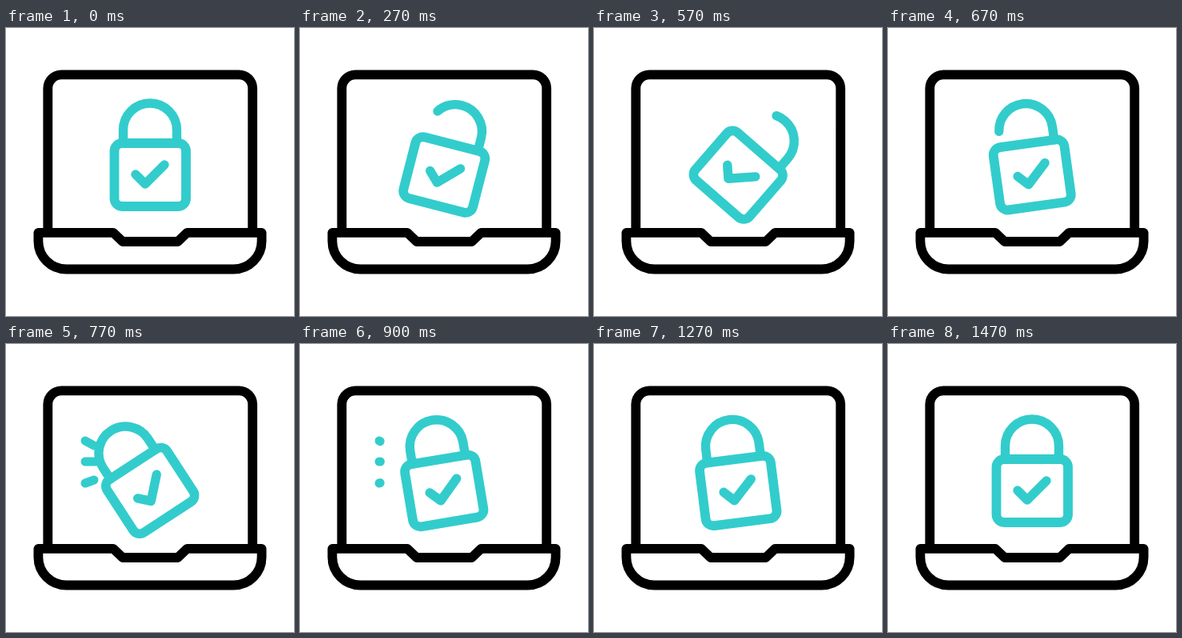
Animation, 360 px wide and 360 px high, one loop 1.67 s. Source, as an HTML page:

```html
<!DOCTYPE html>
<html lang="en">
<head>
<meta charset="utf-8">
<title>Secure laptop</title>
<style>
  html, body { margin: 0; width: 100%; height: 100%; overflow: hidden; background: #fff; }
  svg { display: block; width: 100%; height: 100%; }
</style>
</head>
<body>
<svg viewBox="0 0 360 360" fill="none" stroke-width="11.8" stroke-linecap="round" stroke-linejoin="round">
  <g stroke="#000">
    <path d="M52.3 255V75A17 17 0 0 1 69.3 58.3H291.2A17 17 0 0 1 308.2 75V255"/>
    <path d="M40.4 255.8H134L145.8 267H214.7L226.5 255.8H319.6V266.5A35 35 0 0 1 284.6 301.5H75.4A35 35 0 0 1 40.4 266.5Z"/>
  </g>
  <g stroke="#33cccc">
    <g id="burst" stroke-width="11">
      <path pathLength="1" d="M110 127L99 121"/>
      <path pathLength="1" d="M112 147H99"/>
      <path pathLength="1" d="M110 170L99 174"/>
    </g>
    <g id="lock">
      <path id="shackle" stroke-width="11.4" pathLength="100" d="M146.5 144V127.5A33.5 33.5 0 0 1 213.5 127.5V144"/>
      <rect x="135.5" y="144" width="89.5" height="79" rx="9.7"/>
      <path stroke-width="11.4" d="M162 183L174 195L198 171"/>
    </g>
  </g>
</svg>
<script>
const LOOP = 1670, FPS = 30;
const [lock, shackle, burst] = ["lock", "shackle", "burst"].map(id => document.getElementById(id));

// Keys are [frame, value]
const tilt = [[2, 0], [17, 41], [22, -34.5], [32, 15.5], [38, -7.2], [44, 0]];
const opening = [[2, 0], [12, 41], [17, 41], [22, 0]];
const burstHead = [[20, 0], [23, 1]];
const burstTail = [[23, 0], [28, 1]];

function valueAt(keys, frame) {
  const next = keys.findIndex(key => key[0] > frame);
  if (next === 0) return keys[0][1];
  if (next < 0) return keys[keys.length - 1][1];
  const [f0, v0] = keys[next - 1], [f1, v1] = keys[next];
  const p = (frame - f0) / (f1 - f0);
  return v0 + (v1 - v0) * p * p * (3 - 2 * p);
}

function draw() {
  const time = performance.now() % LOOP;
  const frame = Math.floor((time + 3.4) * FPS / 1000);
  lock.setAttribute("transform", `rotate(${valueAt(tilt, frame)} 180 183.5)`);
  shackle.setAttribute("stroke-dasharray", "100 200");
  shackle.setAttribute("stroke-dashoffset", -valueAt(opening, frame));

  const head = valueAt(burstHead, frame), tail = valueAt(burstTail, frame);
  burst.setAttribute("visibility", head > tail ? "visible" : "hidden");
  burst.setAttribute("stroke-dasharray", `${head - tail} 9`);
  burst.setAttribute("stroke-dashoffset", -tail);
  requestAnimationFrame(draw);
}
draw();
</script>
</body>
</html>
```
